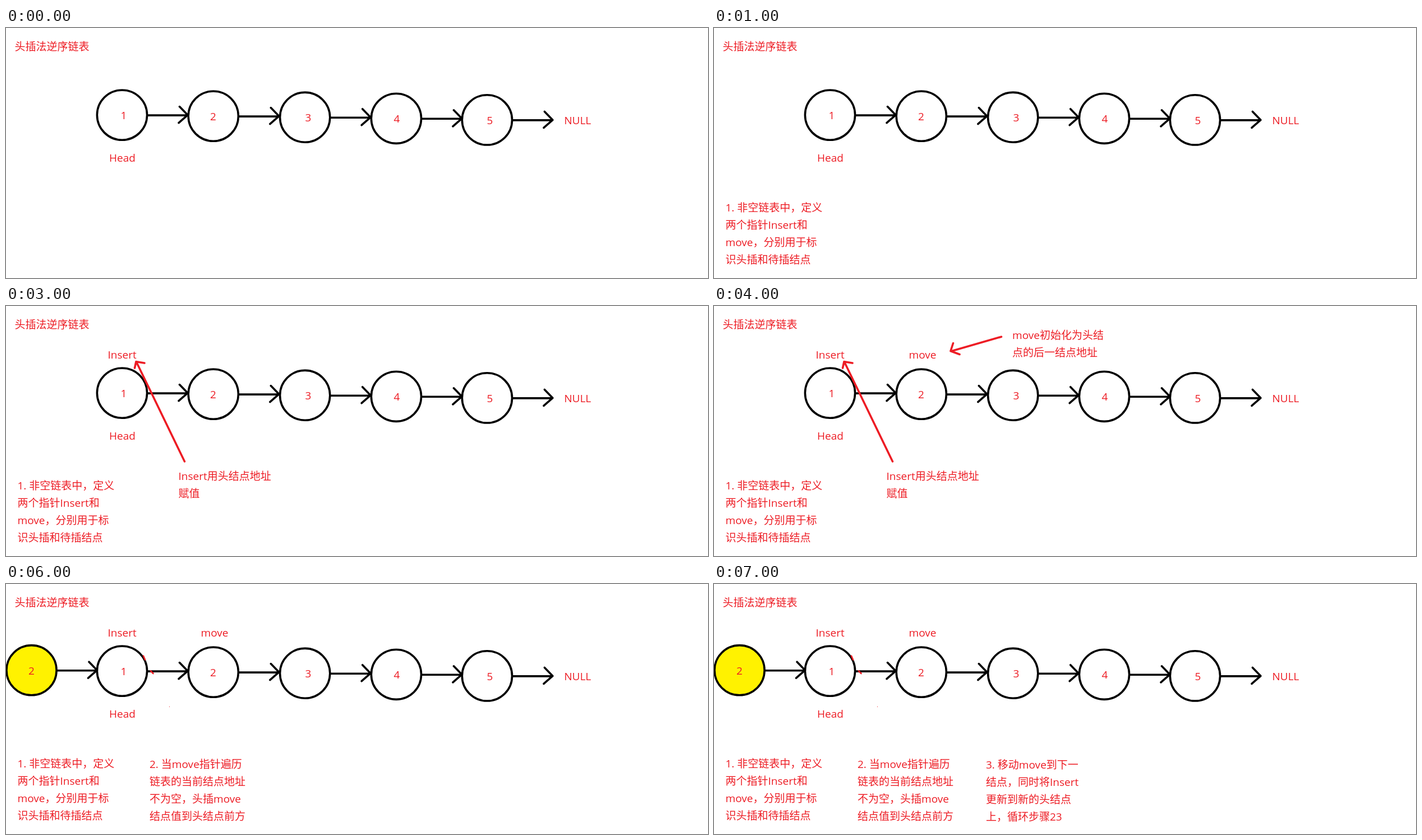
An HTML page for the animation above (8000 ms loop, 1252 by 447 pixels).

```html
<!DOCTYPE html>
<html lang="zh-CN">
<head>
<meta charset="utf-8">
<title>头插法逆序链表</title>
<style>
html, body { margin: 0; width: 100%; height: 100%; overflow: hidden; background: #fff; }
svg { display: block; width: 1252px; height: 447px; }
text { font: 19px "Open Sans", "Noto Sans CJK SC", "Noto Sans CJK", sans-serif; fill: #ed1c24; white-space: pre; }
circle, path { fill: none; stroke: #000; stroke-width: 3.6; stroke-linecap: round; stroke-linejoin: round; }
.red { stroke: #ed1c24; }
.mark { stroke: #ed1c24; stroke-width: 2.6; }
.dot { fill: #ed1c24; }
</style>
</head>
<body>
<svg id="stage" viewBox="0 0 1252 447"></svg>
<script>
const LOOP = 8000, LINE = 31;
const stage = document.getElementById('stage');

function add(parent, tag, attrs, content) {
  const el = document.createElementNS('http://www.w3.org/2000/svg', tag);
  for (const key in attrs) el.setAttribute(key, attrs[key]);
  if (content) el.textContent = content;
  return parent.appendChild(el);
}

function write(parent, x, y, ...lines) {
  lines.forEach((line, i) => add(parent, 'text', { x, y: y + i * LINE }, line));
}

function stroke(parent, d, cls) {
  add(parent, 'path', { d, class: cls || '' });
}

// A list node with its outgoing arrow; (tx, ty) is where the digit starts.
function node(parent, cx, cy, digit, tx, ty, fill = 'none') {
  add(parent, 'circle', { cx, cy, r: 44.6, style: `fill:${fill}` });
  stroke(parent, `M${cx + 45.5} ${cy + 0.5}h71m-14 -15.5l14.5 15l-16 14`);
  write(parent, tx, ty, digit);
}

// Scenes: [start, end, draw]
const scenes = [
  [0, LOOP, g => {
    write(g, 15.5, 40, '头插法逆序链表');
    node(g, 207, 155.6, '1', 204.5, 163);
    node(g, 369.8, 157.6, '2', 364, 165);
    node(g, 533.2, 159.7, '3', 533.5, 166.5);
    node(g, 696, 161.8, '4', 691.5, 168.5);
    node(g, 858, 164.4, '5', 857.5, 172);
    write(g, 995.5, 172, 'NULL');
    write(g, 184, 239, 'Head');
  }],
  [1000, LOOP, g => write(g, 20.5, 328,
    '1. 非空链表中，定义', '两个指针Insert和', 'move，分别用于标', '识头插和待插结点')],
  [2000, LOOP, g => write(g, 181.5, 94, 'Insert')],
  [3000, 5000, g => {
    stroke(g, 'M318.5 278L233 101M229.5 111L232 99.5L247 102', 'red');
    write(g, 307.5, 311, 'Insert用头结点地址', '赋值');
  }],
  [4000, LOOP, g => write(g, 347.5, 94, 'move')],
  [4000, 5000, g => {
    stroke(g, 'M512.5 55L424 80.5M426.5 66.5L422 80.5L438 86.5', 'red');
    write(g, 532, 59, 'move初始化为头结', '点的后一结点地址');
  }],
  [5000, LOOP, g => {
    stroke(g, 'M245 128.5L248 135.5M258 155.5L262.5 160', 'mark');
    add(g, 'rect', { x: 291, y: 219, width: 1, height: 1, class: 'dot' });
    write(g, 256, 329,
      '2. 当move指针遍历', '链表的当前结点地址', '不为空，头插move', '结点值到头结点前方');
  }],
  [6000, LOOP, g => node(g, 45.5, 154.2, '2', 40, 161.5, '#fff200')],
  [7000, LOOP, g => write(g, 485, 330,
    '3. 移动move到下一', '结点，同时将Insert', '更新到新的头结点', '上，循环步骤23')],
];

const shown = scenes.map(([start, end, draw]) => {
  const g = add(stage, 'g', {});
  draw(g);
  return { g, start, end };
});

function tick() {
  const t = performance.now() % LOOP;
  for (const { g, start, end } of shown) {
    g.style.visibility = t >= start && t < end ? 'visible' : 'hidden';
  }
  requestAnimationFrame(tick);
}
tick();
</script>
</body>
</html>
```
